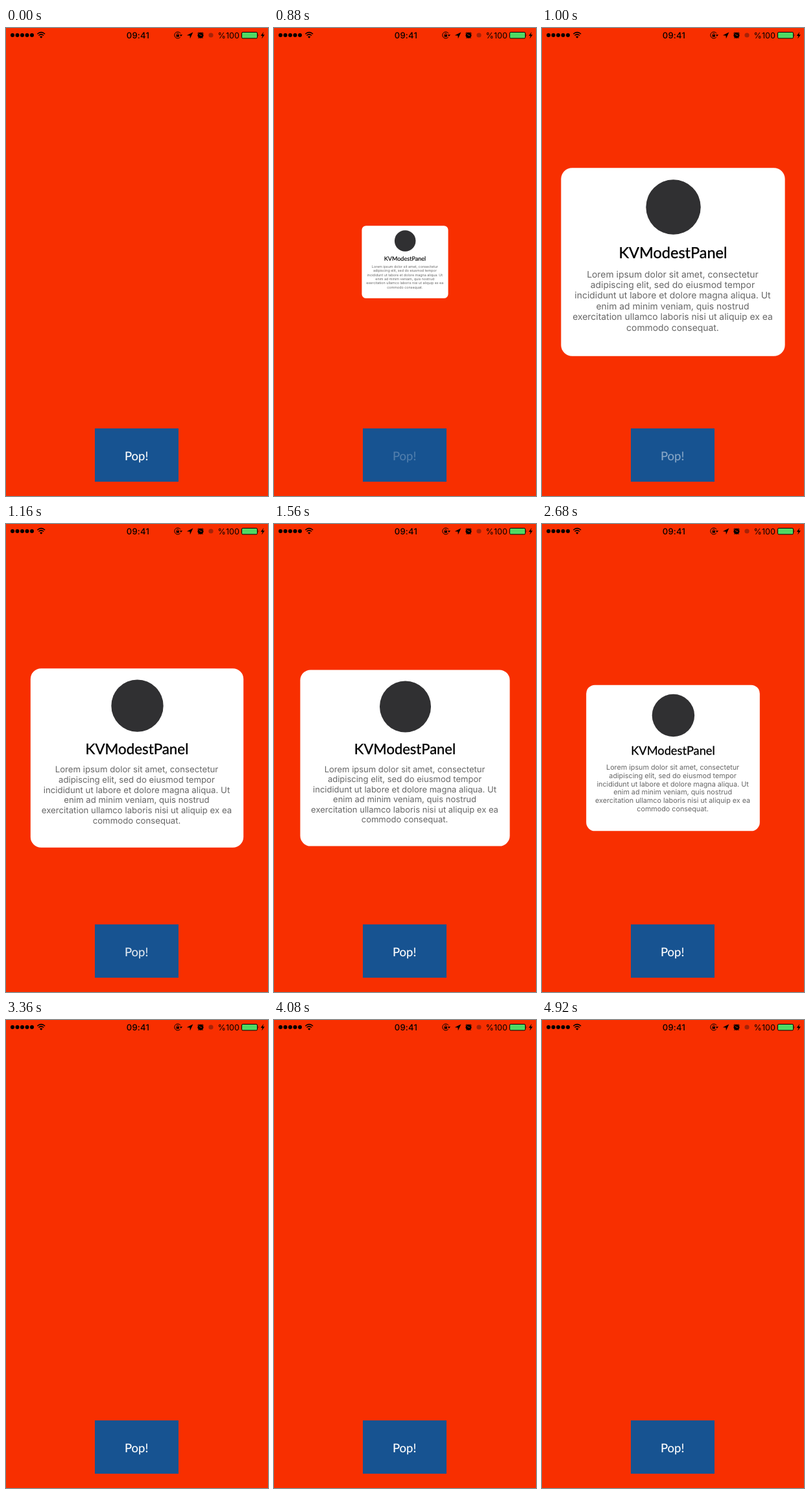
An HTML page for the animation above (4.96 s loop, 404 by 720 pixels).

```html
<!DOCTYPE html>
<html lang="en">
<head>
<meta charset="utf-8">
<title>Popup</title>
<style>
  html, body { margin: 0; width: 100%; height: 100%; overflow: hidden; background: #f82f00; }
  svg { display: block; width: 404px; height: 720px; }
  text { text-anchor: middle; text-rendering: geometricPrecision; }
  .status { font: 400 12.6px Inter, Roboto, sans-serif; }
  .clock { font-size: 13px; font-weight: 500; letter-spacing: .3px; }
  .label { font: 18.5px Lato, sans-serif; fill: #fff; stroke: #fff; stroke-width: .15px; }
  .title { font: 22px Lato, sans-serif; stroke: #000; stroke-width: .35px; }
  .body { font: 13px Inter, sans-serif; fill: #666; }
  .line { fill: none; stroke: #000; }
</style>
</head>
<body>
<svg viewBox="0 0 404 720">
  <rect width="404" height="720" fill="#f82f00"/>

  <g id="signal"></g>
  <path class="line" stroke-width="1.5" d="M48.3 9.2q5.9-5.2 11.8 0M50.4 11.5q3.8-3.2 7.6 0"/>
  <path d="M54.2 15.8l-2.2-2.3q2.2-1.8 4.4 0z"/>
  <text class="status clock" x="203.5" y="15.7">09:41</text>

  <path class="line" d="M269.1 8.4A5 5 0 1 0 268.8 14"/>
  <path d="M267.7 10.2h4.4l-2.2 2.7z"/>
  <rect x="262.6" y="10.4" width="4.4" height="3.2"/>
  <path class="line" stroke-width=".8" d="M263.5 10.5V9.3a1.3 1.3 0 0 1 2.6 0v1.2"/>
  <path d="M288.4 6.5l-9.6 4.7 4.6.5.5 4.6z"/>
  <circle cx="300" cy="11.3" r="4.5"/>
  <path class="line" d="M295.4 8.4l2-2M304.6 8.4l-2-2M297.4 14.8l-.9 1.2M302.6 14.8l.9 1.2"/>
  <path d="M297.8 9.5l2.2 1.8h2.2" fill="none" stroke="#f82f00" stroke-width=".9"/>
  <circle cx="316" cy="11" r="3.6" fill="#a52208"/>
  <text class="status" x="343.3" y="15.7">%100</text>
  <rect x="363.5" y="6.5" width="24" height="9.4" rx="1.6" fill="#4fd964" stroke="#000"/>
  <path d="M388.8 9.2q1.6 2 0 4z"/>
  <path d="M397.2 6l-4.4 6h2.7l-1.2 4.5 4.5-6.2h-2.8z"/>

  <rect x="137" y="616" width="129" height="82" fill="#175391"/>
  <text id="label" class="label" x="201.2" y="664.6">Pop!</text>

  <g id="card" display="none">
    <rect x="-161.5" y="-135.5" width="323" height="271" rx="16" fill="#fff"/>
    <circle cx=".5" cy="-79" r="39.5" fill="#303032"/>
    <text class="title" x="0" y="-5.5">KVModestPanel</text>
    <g id="copy" class="body"></g>
  </g>
</svg>
<script>
  const LOOP = 4960, STEP = 40;
  const PRESS = 720, RELEASE = 812, FADE = 470;
  const CLOSE = 2601, CLOSE_TIME = 300;
  const DECAY = 10.4, SWING = 13.9; // popup spring, per second

  const $ = id => document.getElementById(id);
  const card = $('card'), label = $('label');

  function add(parent, tag, attrs, text = '') {
    const el = document.createElementNS('http://www.w3.org/2000/svg', tag);
    for (const key in attrs) el.setAttribute(key, attrs[key]);
    el.textContent = text;
    parent.append(el);
  }

  for (let i = 0; i < 5; i++) add($('signal'), 'circle', { cx: 10 + i * 7.5, cy: 11, r: 3 });

  [
    'Lorem ipsum dolor sit amet, consectetur',
    'adipiscing elit, sed do eiusmod tempor',
    'incididunt ut labore et dolore magna aliqua. Ut',
    'enim ad minim veniam, quis nostrud',
    'exercitation ullamco laboris nisi ut aliquip ex ea',
    'commodo consequat.'
  ].forEach((line, i) => add($('copy'), 'text', { x: -.5, y: 22 + i * 15.4 }, line));

  function ease(p) {
    p = Math.min(1, Math.max(0, p));
    return p * p * (3 - 2 * p);
  }

  function spring(ms) {
    const s = ms / 1000, a = SWING * s;
    return 1 - Math.exp(-DECAY * s) * (Math.cos(a) + DECAY / SWING * Math.sin(a));
  }

  function cardScale(t) {
    if (t < RELEASE) return 0;
    return t < CLOSE ? spring(t - RELEASE) : 1 - ease((t - CLOSE) / CLOSE_TIME);
  }

  function render(t) {
    const scale = cardScale(t);
    card.setAttribute('display', scale > .005 ? 'inline' : 'none');
    card.setAttribute('transform', `translate(202 360) scale(${scale})`);
    label.setAttribute('opacity', t < PRESS ? 1 : .2 + .8 * ease((t - RELEASE) / FADE));
  }

  const start = performance.now();
  function tick() {
    const t = (performance.now() - start) % LOOP;
    render(Math.floor(t / STEP) * STEP);
    requestAnimationFrame(tick);
  }
  tick();
</script>
</body>
</html>
```
